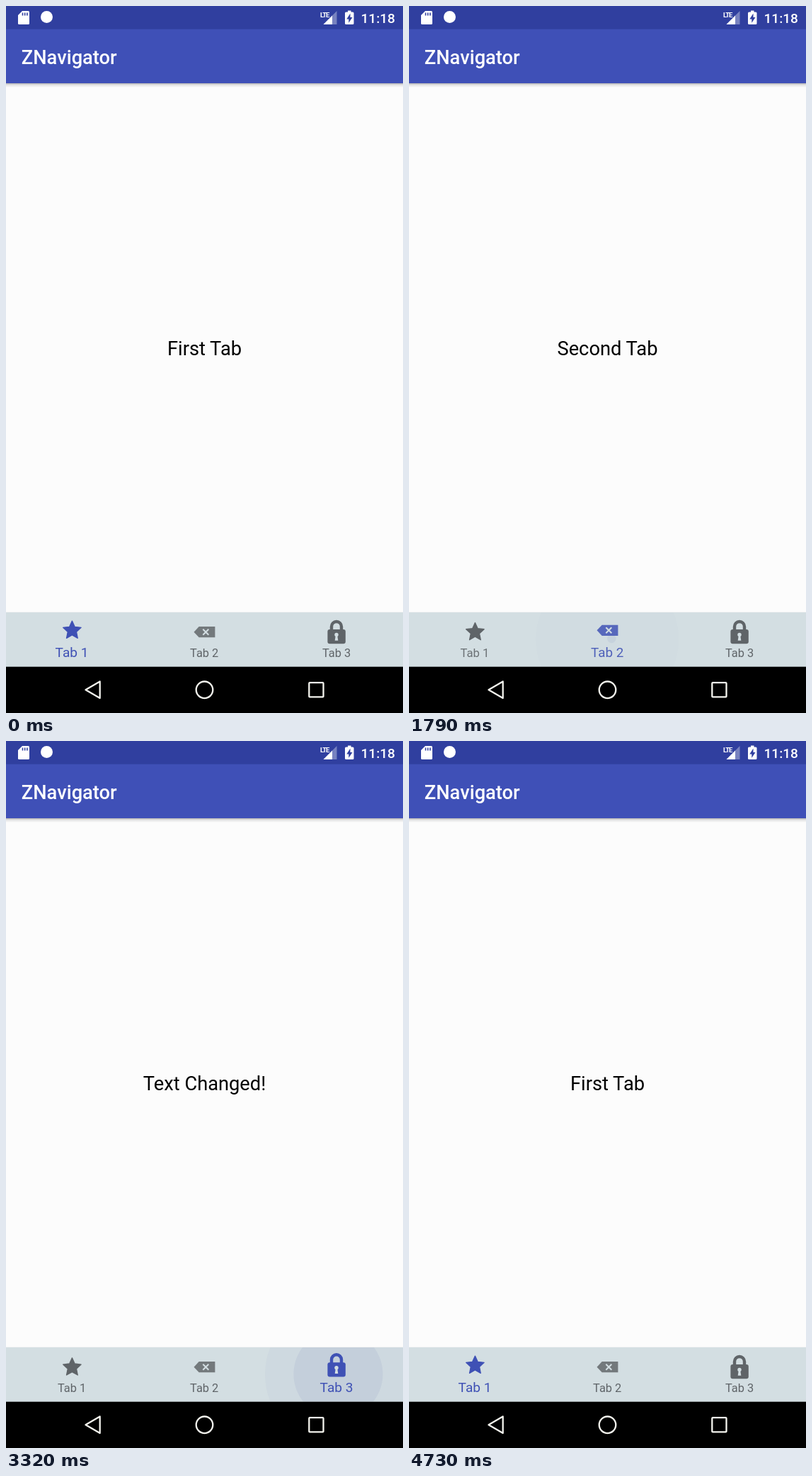
Animation, 561 px wide and 998 px high, one loop 8 s. Source, as an HTML page:

```html
<!DOCTYPE html>
<html lang="en">
<head>
<meta charset="utf-8">
<title>Bottom navigation</title>
<style>
  html, body { margin: 0; width: 100%; height: 100%; overflow: hidden; background: #fcfcfc; }
  svg { display: block; width: 561px; height: 998px; font-family: Roboto, sans-serif; }
  .medium { font-weight: 500; fill: #fff; }
  .line { fill: none; stroke: #f4f4ee; stroke-width: 2.3; stroke-linejoin: round; }
  .hole { fill: #d3dee2; }
  .cut { fill: none; stroke: #d3dee2; stroke-width: 2; }
</style>
</head>
<body>
<svg viewBox="0 0 561 998">
  <defs>
    <linearGradient id="shade" x2="0" y2="1">
      <stop offset="0" stop-color="#000" stop-opacity=".3"/>
      <stop offset=".4" stop-color="#000" stop-opacity=".1"/>
      <stop offset="1" stop-color="#000" stop-opacity="0"/>
    </linearGradient>
    <clipPath id="barClip"><rect y="856" width="561" height="76.5"/></clipPath>
  </defs>

  <rect width="561" height="998" fill="#fcfcfc"/>
  <rect y="109" width="561" height="6" fill="url(#shade)"/>
  <rect y="32" width="561" height="77" fill="#3f50b7"/>
  <rect width="561" height="32.7" fill="#303f9f"/>

  <!-- status bar -->
  <path d="M23 7H31.5Q33 7 33 8.500V24.500Q33 26 31.500 26H18.500Q17 26 17 24.500V13Z" fill="#fff"/>
  <path d="M23.500 9.500v4M26.700 9.500v4M29.900 9.500v4" stroke="#303f9f" stroke-width="1.600"/>
  <circle cx="57.500" cy="15.500" r="8.500" fill="#fff"/>
  <path d="M467.500 7V26H448.500Z" fill="#fff" opacity=".35"/>
  <path d="M461 13.500V26H448.500Z" fill="#fff"/>
  <text class="medium" x="444" y="16" font-size="9.500" letter-spacing="-1" style="font-weight:700">LTE</text>
  <path d="M483 6.500h4.500v2H490q1.500 0 1.500 1.500V24.500q0 1.500-1.500 1.500H480.500q-1.500 0-1.500-1.500V10q0-1.500 1.500-1.500H483Z" fill="#fff"/>
  <path d="M486.500 10.500V16H489.500L484.300 23.800V18.500H481.300Z" fill="#303f9f"/>
  <text class="medium" x="501.500" y="24" font-size="19.100">11:18</text>

  <text class="medium" x="21.800" y="81.800" font-size="27.270">ZNavigator</text>
  <text id="content" x="280.500" y="493.300" font-size="27.270" text-anchor="middle"></text>

  <!-- bottom bar -->
  <rect y="855" width="561" height="2" fill="#000" opacity=".04"/>
  <rect y="856" width="561" height="77" fill="#d3dee2"/>
  <g clip-path="url(#barClip)" fill="#3c469f">
    <circle id="halo" cy="894" r="101"/>
    <circle id="ripple"/>
  </g>
  <g id="tabs"></g>

  <!-- system keys -->
  <rect y="932.700" width="561" height="66" fill="#000"/>
  <path class="line" d="M112.500 965.300L132.700 953.500V977Z"/>
  <circle class="line" cx="280.500" cy="965.300" r="11.800"/>
  <rect class="line" x="428.300" y="955.200" width="20.200" height="20.200" rx="1"/>
</svg>

<script>
const LOOP = 8000, STEP = 40, RADIUS = 101;
const SMALL = 16.37, LARGE = 19.1, LIFT = 2.7;
const BLUE = '#3f51b5', GRAY = '#5f6468';
const CENTERS = [93, 280.2, 467];
const EASED = [0, .42, .89, 1]; // label and icon transition, one entry per step
const TAPS = [
  { at: 1710, from: 0, to: 1, text: 'Second Tab' },
  { at: 3160, from: 1, to: 2, text: 'Text Changed!' },
  { at: 4310, from: 2, to: 0, text: 'First Tab' }
];

const star = Array.from({ length: 10 }, (_, i) => {
  const r = i % 2 ? 6.4 : 13.4, a = i * Math.PI / 5;
  return `${(r * Math.sin(a)).toFixed(2)},${(-r * Math.cos(a)).toFixed(2)}`;
}).join(' ');

const ICONS = [
  `<polygon points="${star}" transform="translate(.4 884.2)" stroke="currentColor" stroke-width="1.3" stroke-linejoin="round"/>`,
  `<g transform="translate(0 883.7)"><path opacity=".83" d="M-14.7 0L-7.5 -7.6H15.2V7.6H-7.5Z"/>
   <path class="cut" d="M-1.900 -4L6.100 4M6.100 -4L-1.900 4"/></g>`,
  `<path d="M-7 882V876a7 7 0 0 1 14 0V882" fill="none" stroke="currentColor" stroke-width="4.400"/>
   <rect x="-12.600" y="880" width="25.400" height="20.300" rx="3"/>
   <path class="hole" d="M-1.300 889h2.600l1 6.800h-4.600Z"/><circle class="hole" cy="887.500" r="2.700"/>`
];

const byId = id => document.getElementById(id);
const set = (el, attrs) => { for (const k in attrs) el.setAttribute(k, attrs[k]); };
const clamp = v => Math.max(0, Math.min(1, v));

byId('tabs').innerHTML = ICONS.map((icon, i) =>
  `<g transform="translate(${CENTERS[i]})" fill="currentColor"><g>${icon}</g>
   <text y="919.200" text-anchor="middle">Tab ${i + 1}</text></g>`).join('');
const tabs = [...byId('tabs').children];

function drawTab(i, size, active, fade) {
  const [icon, label] = tabs[i].children;
  tabs[i].style.color = active ? BLUE : GRAY;
  set(icon, { transform: `translate(0 ${-LIFT * size})` });
  set(label, { 'font-size': SMALL + (LARGE - SMALL) * size, opacity: fade });
}

function drawRipple(tap, t) {
  const grow = 1 - (1 - clamp((t - 73) / 225)) ** 2;
  const out = 1 - clamp((t - 200) / 200);
  const cx = CENTERS[tap.to];
  set(byId('ripple'), {
    cx: cx + 6.5 * (1 - grow), cy: 894 - (1 - grow),
    r: RADIUS * grow, opacity: .07 * out
  });
  set(byId('halo'), { cx, opacity: .03 * clamp((t - 40) / 120) * out });
}

function draw(time) {
  const tap = TAPS.filter(s => s.at <= time).pop() || { ...TAPS[2], at: -LOOP };
  const step = Math.floor((time - tap.at) / STEP);
  const p = EASED[Math.min(step, EASED.length - 1)];
  const fade = step ? p : 1;
  tabs.forEach((_, i) => {
    const moving = i === tap.from || i === tap.to;
    const size = i === tap.to ? p : i === tap.from ? 1 - p : 0;
    drawTab(i, size, i === tap.to, moving ? fade : 1);
  });
  const previous = TAPS.find(s => s.to === tap.from);
  byId('content').textContent = step ? tap.text : previous.text;
  drawRipple(tap, step * STEP);
}

const start = performance.now();
function tick() {
  draw((performance.now() - start) % LOOP);
  requestAnimationFrame(tick);
}
tick();
</script>
</body>
</html>
```
